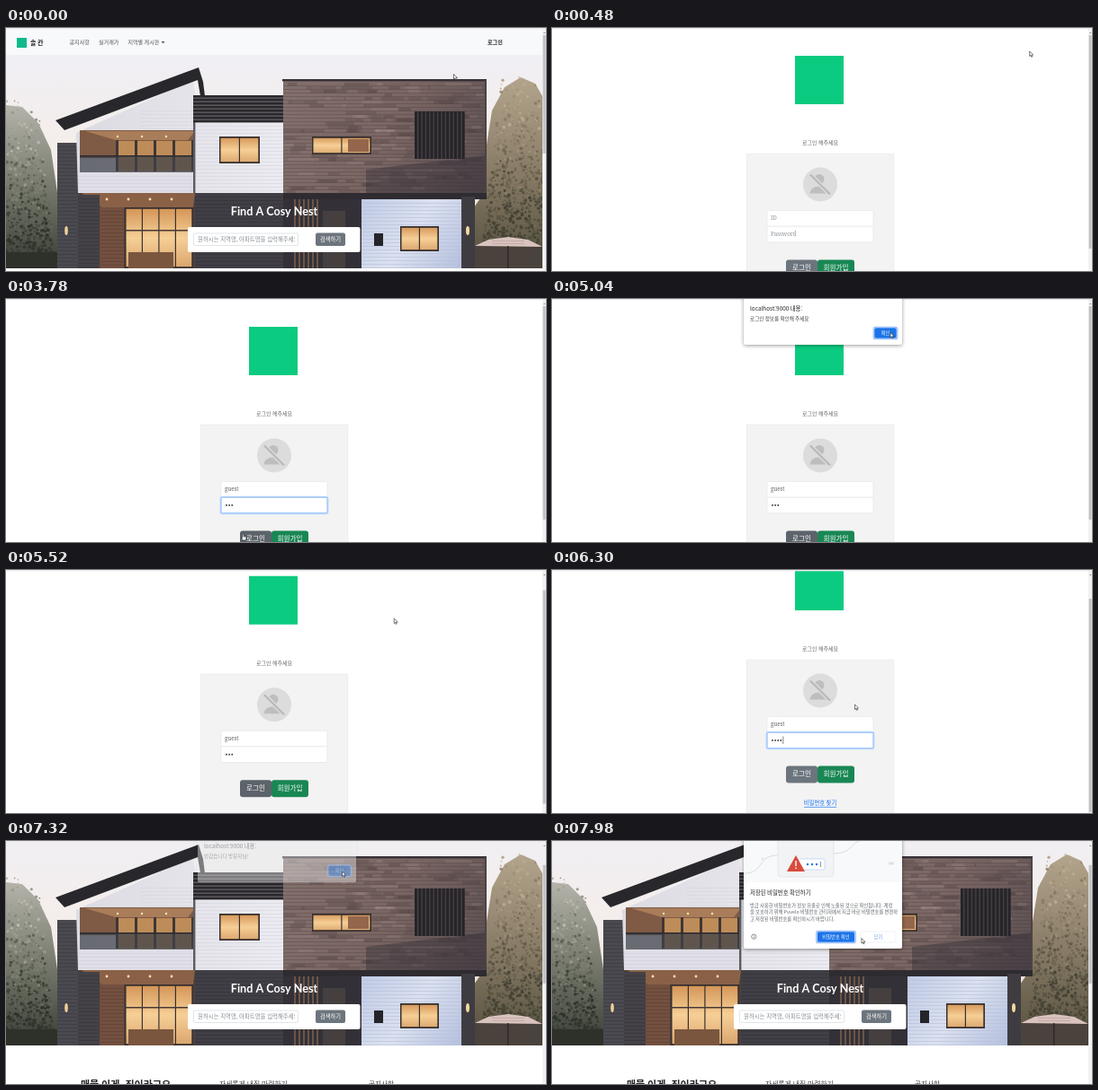
These frames come from a looping animation (600x271 px, 8000 ms). An HTML page with a canvas:

```html
<!DOCTYPE html>
<html lang="ko">
<head>
<meta charset="utf-8">
<style>
html, body { margin: 0; width: 100%; height: 100%; overflow: hidden; background: #fff; }
canvas { display: block; width: 600px; height: 271px; }
</style>
</head>
<body>
<canvas id="stage"></canvas>
<script>
const W = 600, H = 271, LOOP = 8000, STEP = 60;
const SANS = '"Noto Sans CJK KR", "Noto Sans", sans-serif';
const SERIF = '"Noto Serif", "Noto Sans CJK KR", serif';
const USER = 'guest';
const dpr = window.devicePixelRatio || 1;

function prepare(canvas) {
  canvas.width = W * dpr;
  canvas.height = H * dpr;
  const c = canvas.getContext('2d');
  c.scale(dpr, dpr);
  return c;
}
const ctx = prepare(document.getElementById('stage'));

const clamp = v => Math.max(0, Math.min(1, v));
const ramp = (t, a, b) => clamp((t - a) / (b - a));
const ease = p => p * p * (3 - 2 * p);
const count = (t, times) => times.filter(k => t >= k).length;

function rect(x, y, w, h, fill, c = ctx) {
  c.fillStyle = fill;
  c.fillRect(x, y, w, h);
}
function poly(c, fill, ...p) {
  c.fillStyle = fill;
  c.beginPath();
  for (let i = 0; i < p.length; i += 2) c.lineTo(p[i], p[i + 1]);
  c.closePath();
  c.fill();
}
function rounded(x, y, w, h, r, fill, stroke, line = 0.6) {
  ctx.beginPath();
  ctx.roundRect(x, y, w, h, r);
  if (fill) { ctx.fillStyle = fill; ctx.fill(); }
  if (stroke) { ctx.strokeStyle = stroke; ctx.lineWidth = line; ctx.stroke(); }
}
function disc(x, y, r, fill, c = ctx, ry = r) {
  c.fillStyle = fill;
  c.beginPath();
  c.ellipse(x, y, r, ry, 0, 0, 7);
  c.fill();
}
function text(s, x, y, size, color, font = SERIF, weight = 400, align = 'left') {
  ctx.font = `${weight} ${size}px ${font}`;
  ctx.textAlign = align;
  ctx.textBaseline = 'middle';
  ctx.fillStyle = color;
  ctx.fillText(s, x, y);
}

// ---- house picture, drawn once ----
function makeHouse() {
  const canvas = document.createElement('canvas');
  const c = prepare(canvas);
  let seed = 7;
  const rnd = () => (seed = (seed * 16807) % 2147483647) / 2147483647;
  const box = (x, y, w, h, f) => rect(x, y, w, h, f, c);
  const gradient = (x0, y0, x1, y1, ...colors) => {
    const g = c.createLinearGradient(x0, y0, x1, y1);
    colors.forEach((k, i) => g.addColorStop(i / (colors.length - 1), k));
    return g;
  };
  const siding = (x, y, w, h, gap, f) => {
    for (let i = gap; i < h; i += gap) box(x, y + i, w, 0.6, f);
  };
  const planks = (x, y, w, h, n, colors) => {
    for (let i = 0; i < n; i++) {
      const row = Math.floor(rnd() * h / 4) * 4, len = 8 + rnd() * 26;
      box(x + rnd() * (w - len), y + row, len, 3.5, colors[i % colors.length]);
    }
  };
  // speckles that darken towards the ground
  const leaves = (x, y, w, h, n, colors) => {
    for (let i = 0; i < n; i++) {
      const v = Math.sqrt(rnd()), half = w * (0.45 + v * 0.55) / 2;
      const shade = Math.floor(clamp(v + (rnd() - 0.5) * 0.4) * (colors.length - 0.01));
      disc(x + w / 2 + (rnd() * 2 - 1) * half, y + v * h, 0.6 + rnd() * 1.4, colors[shade], c);
    }
  };
  const glow = (x, y, w, h, panes) => {
    box(x, y, w, h, '#38302f');
    const pw = (w - 2) / panes;
    for (let i = 0; i < panes; i++) {
      const px = x + 1.5 + i * pw;
      box(px, y + 1.8, pw - 1.2, h - 3.6, gradient(0, y, 0, y + h, '#d29355', '#f6cf96', '#d9a46c'));
    }
  };

  c.beginPath();
  c.rect(0, 30, 596, 238);
  c.clip();
  box(0, 30, 596, 238, gradient(0, 30, 0, 268, '#f0eff4', '#f5ede9', '#dccfc7'));

  // trees and garden
  poly(c, gradient(0, 85, 0, 268, '#b5b4ab', '#777a6d', '#393d34'),
    0, 86, 18, 88, 36, 106, 50, 136, 58, 190, 58, 268, 0, 268);
  leaves(-22, 80, 78, 186, 800, ['#b9b8ae', '#9a9b8e', '#7c7f71', '#5f6456', '#41463c', '#30342c']);
  poly(c, gradient(0, 55, 0, 260, '#b3a48c', '#8a7d68', '#57523f'),
    534, 130, 540, 92, 554, 66, 572, 55, 588, 62, 596, 76, 596, 268, 520, 268, 520, 200, 534, 180);
  leaves(528, 50, 84, 200, 900, ['#b8a88f', '#a09079', '#8a7c67', '#716852', '#5a5544', '#454335']);
  box(0, 250, 58, 18, '#2e3129');
  box(520, 243, 76, 25, '#4a423c');
  poly(c, '#d9c3bf', 521, 243, 536, 236, 558, 233, 580, 236, 596, 244);
  siding(540, 234, 36, 9, 3, '#b89f9a');
  box(557, 243, 1.4, 25, '#2f2825');

  // left column and gable walls
  box(57, 128, 25, 140, '#4a494f');
  siding(57, 128, 25, 140, 4, '#393940');
  poly(c, gradient(80, 0, 308, 0, '#dcdbe2', '#ebebf1'), 78, 117, 208, 58, 214, 104, 308, 104, 308, 184, 80, 184);
  siding(211, 105, 97, 78, 4, '#d5d6df');
  siding(150, 88, 60, 26, 4, '#d5d6df');

  // upper balcony
  poly(c, '#7f5a45', 82, 114, 210, 114, 210, 145, 82, 145);
  poly(c, '#a97d59', 88, 115, 210, 115, 202, 125, 122, 125);
  box(122, 126, 86, 34, '#bd8c59');
  for (let x = 122; x < 208; x += 21) box(x, 125, 3, 35, '#403734');
  for (let x = 124; x < 205; x += 27) disc(x, 121, 1.2, '#ffe7b2', c);
  box(82, 143, 128, 18, 'rgba(62,64,73,.72)');
  box(82, 142, 128, 1.5, '#2b2b30');
  box(80, 161, 130, 23, '#e0dfe7');
  siding(80, 161, 130, 23, 4, '#cfcfd9');
  box(208, 104, 2.4, 80, '#5d5a60');
  poly(c, '#28282c', 55, 103, 214, 44, 219, 60, 221, 76, 216, 76, 213, 58, 65, 114);

  // terrace slats
  box(208, 75, 100, 29, '#5a555a');
  for (let y = 75; y < 104; y += 4) box(208, y, 100, 2.4, '#29282c');
  glow(237, 121, 45, 30, 2);

  // ground floor left
  box(80, 184, 130, 84, '#4b403b');
  poly(c, '#8a6146', 84, 184, 210, 184, 208, 200, 106, 200);
  for (let x = 112; x < 208; x += 24) disc(x, 191, 1.4, '#ffe2a8', c);
  box(104, 200, 27, 68, '#73503f');
  siding(104, 200, 27, 68, 4, '#5b3f33');
  box(80, 186, 24, 82, '#454247');
  siding(80, 186, 24, 82, 4, '#37353a');
  glow(132, 200, 76, 68, 4);
  box(132, 225, 76, 1.5, '#453a36');
  box(136, 250, 50, 18, '#7a563e');
  box(210, 184, 100, 84, '#403f45');
  siding(210, 184, 100, 84, 4, '#323138');

  // timber block
  box(308, 58, 226, 127, gradient(308, 60, 534, 185, '#83706c', '#7a6663', '#5a4e50'));
  planks(308, 61, 224, 122, 150, ['rgba(85,66,66,.3)', 'rgba(170,148,142,.22)', 'rgba(60,48,52,.25)']);
  siding(308, 60, 225, 124, 4, 'rgba(66,52,53,.45)');
  poly(c, 'rgba(45,43,54,.4)', 400, 158, 534, 142, 534, 185, 400, 185);
  box(307, 57, 227, 2.4, '#363136');
  box(532, 58, 2, 126, '#4e4243');
  glow(340, 121, 66, 20, 2);
  box(380, 124, 23, 14, '#94664b');
  box(454, 93, 54, 53, '#463f41');
  for (let x = 454; x < 508; x += 4.4) box(x, 93, 2.9, 53, '#252429');

  // ground floor right
  box(308, 184, 226, 7, '#2e2c31');
  box(308, 191, 88, 77, '#333137');
  for (let x = 320; x < 348; x += 5) box(x, 191, 2, 77, '#6b5547');
  box(352, 204, 25, 64, '#45403f');
  box(395, 191, 111, 77, gradient(395, 191, 506, 268, '#c0cbe6', '#dbe1f0', '#b4c0de'));
  siding(395, 191, 111, 77, 4, '#b7c0d8');
  glow(438, 221, 43, 28, 2);
  box(409, 229, 10, 14, '#252529');
  box(506, 188, 15, 80, '#3f3c41');
  disc(513, 226, 2, '#f5d8a1', c, 5);
  disc(67, 226, 1.8, '#efd09a', c, 5);
  return canvas;
}
const house = makeHouse();

// ---- pages ----
function scrollbar(y, h) {
  rect(596, 0, 4, H, '#f1f1f1');
  poly(ctx, '#8a8a8a', 597, 6, 599.4, 6, 598.2, 4.4);
  rect(596.6, y, 3, h, '#c1c1c1');
  rect(0, 0, W, 1.3, '#ececee');
}

function home(scroll) {
  ctx.save();
  ctx.translate(0, -scroll);
  rect(0, 0, W, 30, '#f8f9fa');
  rect(12, 11, 11, 11, '#10b98c');
  text('솔 칸', 27, 16, 7, '#222', SANS, 700);
  text('공지사항', 70.5, 16.2, 6.1, '#555');
  text('실거래가', 103, 16.2, 6.1, '#555');
  text('지역별 게시판', 135.5, 16.2, 6, '#555');
  poly(ctx, '#555', 172.5, 15, 176.5, 15, 174.5, 17.2);
  text('로그인', 535, 16.2, 6.1, '#222', SERIF, 700);
  ctx.drawImage(house, 0, 0, W, H);
  text('Find A Cosy Nest', 298, 205, 12.6, '#fff', 'Lato, sans-serif', 700, 'center');

  rounded(202, 222, 191.5, 28, 2, '#fff');
  rounded(208.5, 229, 116, 13.5, 1.5, '#fff', '#ced4da');
  ctx.save();
  ctx.beginPath();
  ctx.rect(210, 229, 111, 14);
  ctx.clip();
  text('원하시는 지역명, 아파트명을 입력해주세요', 213, 236, 6.4, '#868c92');
  ctx.restore();
  rounded(344, 228.5, 33, 14.5, 2, '#6c757d');
  text('검색하기', 360.5, 236, 6.3, '#fff', SERIF, 400, 'center');

  text('매물 이게, 집이라고요', 83, 313, 11, '#222', SERIF, 700);
  text('자세롭게 내집 마련하기', 237, 312, 7.8, '#444');
  text('공지사항', 403, 312, 7.6, '#444');
  ctx.restore();
  scrollbar(8 + scroll * 0.47, 132);
}

function field(y, ring) {
  rounded(239, y, 118, 17.6, 1.5, '#fff', '#dee2e6');
  if (!ring) return;
  ctx.save();
  ctx.globalAlpha *= ring;
  rounded(238.4, y - 0.6, 119.2, 18.8, 2, null, '#c2dbfe', 1.8);
  rounded(239, y, 118, 17.6, 1.5, null, '#86b7fe', 0.8);
  ctx.restore();
}

function avatar(x, y) {
  disc(x, y, 19, '#dcdcdc');
  disc(x - 1, y - 6, 5.5, '#bebebe');
  ctx.save();
  ctx.beginPath();
  ctx.rect(x - 13, y + 1, 25, 9);
  ctx.clip();
  disc(x - 1, y + 10, 10.5, '#bebebe', ctx, 8);
  ctx.restore();
  for (const [color, width] of [['#dcdcdc', 5], ['#b8b8b8', 2.2]]) {
    ctx.strokeStyle = color;
    ctx.lineWidth = width;
    ctx.beginPath();
    ctx.moveTo(x - 11, y - 11);
    ctx.lineTo(x + 11, y + 11);
    ctx.stroke();
  }
}

function login(t, scroll, hot) {
  const userRing = t < 2400 ? ramp(t, 840, 960) : 0;
  const passRing = t < 3840 ? ramp(t, 2340, 2460) : t < 6720 ? ramp(t, 5880, 6000) : 0;
  const typed = USER.slice(0, count(t, [1320, 1380, 1440, 1560, 1620]));
  const dots = count(t, [3120, 3240, 3360, 6180]);

  ctx.save();
  ctx.translate(0, -scroll);
  rect(270, 31, 54, 54, '#0bcb80');
  text('로그인 해주세요', 298, 127.5, 6, '#666', SANS, 400, 'center');
  rounded(216.3, 140.3, 163.5, 200, 0, '#f3f3f3', '#e6e6e6');
  avatar(298, 174.5);

  if (userRing) { field(221.2, 0); field(203.6, userRing); }
  else { field(203.6, 0); field(221.2, passRing); }
  text(typed || 'ID', 243, 212.3, 6.2, typed ? '#666' : '#8b9197');
  if (t >= 900 && t < 1980) {
    const x = 243.5 + (typed ? ctx.measureText(typed).width : 0);
    rect(x, 208, 0.6, 8.5, '#333');
  }
  if (!dots) text('Password', 243, 229.8, 6.2, '#8b9197');
  for (let i = 0; i < dots; i++) disc(245 + i * 3.1, 230, 0.9, '#333');
  const caret = (t >= 2460 && t < 2940) || (t >= 3120 && t < 3660) || (t >= 6000 && t < 6660);
  if (caret) rect(244.2 + dots * 3.1, 225.5, 0.6, 8.5, '#333');

  rounded(260, 258.5, 35, 19, 3, hot ? '#5c636a' : '#6c757d');
  rounded(295, 258.5, 41, 19, 3, '#198754');
  text('로그인', 277.5, 268, 7.6, '#fff', SERIF, 400, 'center');
  text('회원가입', 315.5, 268, 7.6, '#fff', SERIF, 400, 'center');
  text('비밀번호 찾기', 298, 300.5, 6.3, '#0d6efd', SERIF, 400, 'center');
  rect(280, 304, 36, 0.6, '#0d6efd');
  ctx.restore();
  scrollbar(8 + scroll * 0.6, 238);
}

// ---- browser dialogs ----
function panel(height) {
  ctx.save();
  ctx.shadowColor = `rgba(0,0,0,${0.4 * ctx.globalAlpha})`;
  ctx.shadowBlur = 4 * dpr;
  ctx.shadowOffsetY = dpr;
  rounded(213, -12, 176, height + 12, 2, '#fff');
  ctx.restore();
}
function primary(x, y, w, h, label, size) {
  rounded(x - 0.6, y - 0.6, w + 1.2, h + 1.2, 2.2, null, '#8ab4f8', 1.4);
  rounded(x, y, w, h, 2, '#1a73e8', '#fff', 0.5);
  text(label, x + w / 2, y + h / 2, size, '#fff', SANS, 400, 'center');
}
function faded(alpha, dy, draw) {
  if (alpha <= 0) return;
  ctx.save();
  ctx.globalAlpha = alpha;
  ctx.translate(0, dy);
  draw();
  ctx.restore();
}

function notice(t, open, close, message) {
  const shown = ramp(t, open - 60, open + 120), gone = ramp(t, close, close + 100);
  faded(shown * (1 - gone), -8 * (1 - shown + gone), () => {
    panel(51);
    text('localhost:9000 내용:', 220, 10.5, 6.4, '#202124', SANS);
    text(message, 220, 22, 5.6, '#3c4043', SANS);
    primary(358, 32, 25, 12, '확인', 5.3);
  });
}

function squiggle(x, y, dx, dy) {
  ctx.strokeStyle = '#dadce0';
  ctx.lineWidth = 1;
  ctx.beginPath();
  ctx.moveTo(x, y);
  ctx.bezierCurveTo(x + dx * 0.6, y, x + dx * 0.4, y + dy, x + dx, y + dy);
  ctx.stroke();
}

function passwordCheck(t) {
  const p = ramp(t, 7560, 7740);
  faded(p, -8 * (1 - p), () => {
    panel(120);
    rect(213, -12, 176, 58, '#f8f9fa');
    squiggle(214, 36, 36, -20);
    squiggle(313, 14, 40, -16);
    disc(234, 20, 1.6, '#e3e5e8');
    rounded(251, -8, 62, 48, 4, '#f1f3f4', '#dadce0');
    rounded(274, 20, 29, 12, 2, '#fff', '#aecbfa');
    for (let i = 0; i < 3; i++) disc(284 + i * 5, 26, 1.2, '#1a73e8');
    rect(298, 23, 0.7, 6, '#5f6368');
    poly(ctx, '#d94b3d', 271, 16, 281, 34, 261, 34);
    rect(270.3, 22, 1.4, 6, '#fff');
    rect(270.3, 29.5, 1.4, 1.5, '#fff');
    rounded(374, 23.5, 6, 3, 1, '#dfe1e5');
    text('저장된 비밀번호 확인하기', 220, 57.5, 6.4, '#202124', SANS);
    const lines = [
      '방금 사용한 비밀번호가 정보 유출로 인해 노출된 것으로 확인됩니다. 계정',
      '을 보호하기 위해 Puvelo 비밀번호 관리자에서 지금 바로 비밀번호를 변경하',
      '고 저장된 비밀번호를 확인하시기 바랍니다.'
    ];
    lines.forEach((s, i) => text(s, 220, 71.5 + i * 7.8, 5.3, '#5f6368', SANS));
    ctx.strokeStyle = '#5f6368';
    ctx.lineWidth = 0.7;
    ctx.beginPath();
    ctx.arc(224.3, 106.7, 2.6, 0, 7);
    ctx.stroke();
    rect(224, 106.2, 0.7, 2, '#5f6368');
    rect(224, 104.9, 0.7, 0.7, '#5f6368');
    primary(294.5, 101, 42, 12, '비밀번호 확인', 5.3);
    rounded(343, 101, 39, 12, 2, '#fff', '#e4e7eb');
    text('닫기', 362.5, 107, 5.3, '#6f9be0', SANS, 400, 'center');
  });
}

// ---- pointer: time, x, y ----
const path = [
  [0, 497.5, 51.5], [300, 543, 15], [420, 543, 15], [840, 320, 213], [2280, 320, 213],
  [2400, 320, 228], [2700, 390, 38], [3060, 390, 232], [3240, 474, 230], [3480, 430, 230],
  [3600, 430, 230], [3780, 264, 265], [3900, 264, 265], [4140, 432, 120], [4440, 373, 36],
  [4620, 376, 37.5], [5100, 376, 37.5], [5400, 430, 60], [5820, 436, 30], [6000, 320, 190],
  [6300, 336.5, 150], [6600, 272, 228], [6780, 272, 228], [7140, 373.5, 34], [7560, 373.5, 34],
  [7860, 344, 108.5], [8000, 344, 108.5]
];
function pointerAt(t) {
  const i = path.findIndex(k => k[0] > t);
  const [t0, x0, y0] = path[i - 1], [t1, x1, y1] = path[i];
  const p = ease(ramp(t, t0, t1));
  return [x0 + (x1 - x0) * p, y0 + (y1 - y0) * p];
}
function pointer(x, y, kind) {
  ctx.save();
  ctx.translate(x, y);
  ctx.lineWidth = 0.6;
  ctx.strokeStyle = '#222';
  if (kind === 'beam') {
    rect(-0.3, -3, 0.7, 6, '#222');
    rect(-1.3, -3.2, 2.7, 0.6, '#222');
    rect(-1.3, 2.7, 2.7, 0.6, '#222');
  } else if (kind === 'hand') {
    rounded(-1.8, -0.3, 4.6, 4.2, 1.2, '#fff', '#222');
    rounded(-1.2, -3, 1.4, 4.5, 0.7, '#fff', '#222');
    rect(-0.9, 0, 0.9, 2, '#fff');
  } else {
    poly(ctx, '#fff', 0, 0, 0, 5.6, 1.3, 4.4, 2.2, 6.4, 3.1, 6, 2.2, 4.1, 4, 4.1);
    ctx.stroke();
  }
  ctx.restore();
}
function pointerKind(x, y, onLogin, scroll) {
  if (!onLogin) return y < 30 && x > 532 && x < 556 ? 'hand' : 'arrow';
  const py = y + scroll;
  if (x > 239 && x < 357 && py > 203 && py < 239) return 'beam';
  if (x > 260 && x < 336 && py > 258 && py < 278) return 'hand';
  return 'arrow';
}

function draw(t) {
  const scroll = 40 * ease(ramp(t, 5280, 5700));
  const onLogin = t >= 420 && t < 7260;
  const [x, y] = pointerAt(t);
  const alerting = (t >= 3900 && t < 5200) || t >= 6780;
  const kind = alerting ? 'arrow' : pointerKind(x, y, onLogin, scroll);

  rect(0, 0, W, H, '#fff');
  if (onLogin) {
    const hot = (kind === 'hand' && x < 295) || (t >= 3840 && t < 5880) || t >= 6720;
    login(t, scroll, hot);
  } else {
    home(scroll);
  }
  notice(t, 3900, 5100, '로그인 정보를 확인해 주세요');
  notice(t, 6840, 7260, '반갑습니다 방문자님!');
  passwordCheck(t);
  pointer(x, y, kind);
}

function tick() {
  const t = performance.now() % LOOP;
  draw(Math.floor(t / STEP) * STEP);
  requestAnimationFrame(tick);
}
tick();
</script>
</body>
</html>
```
